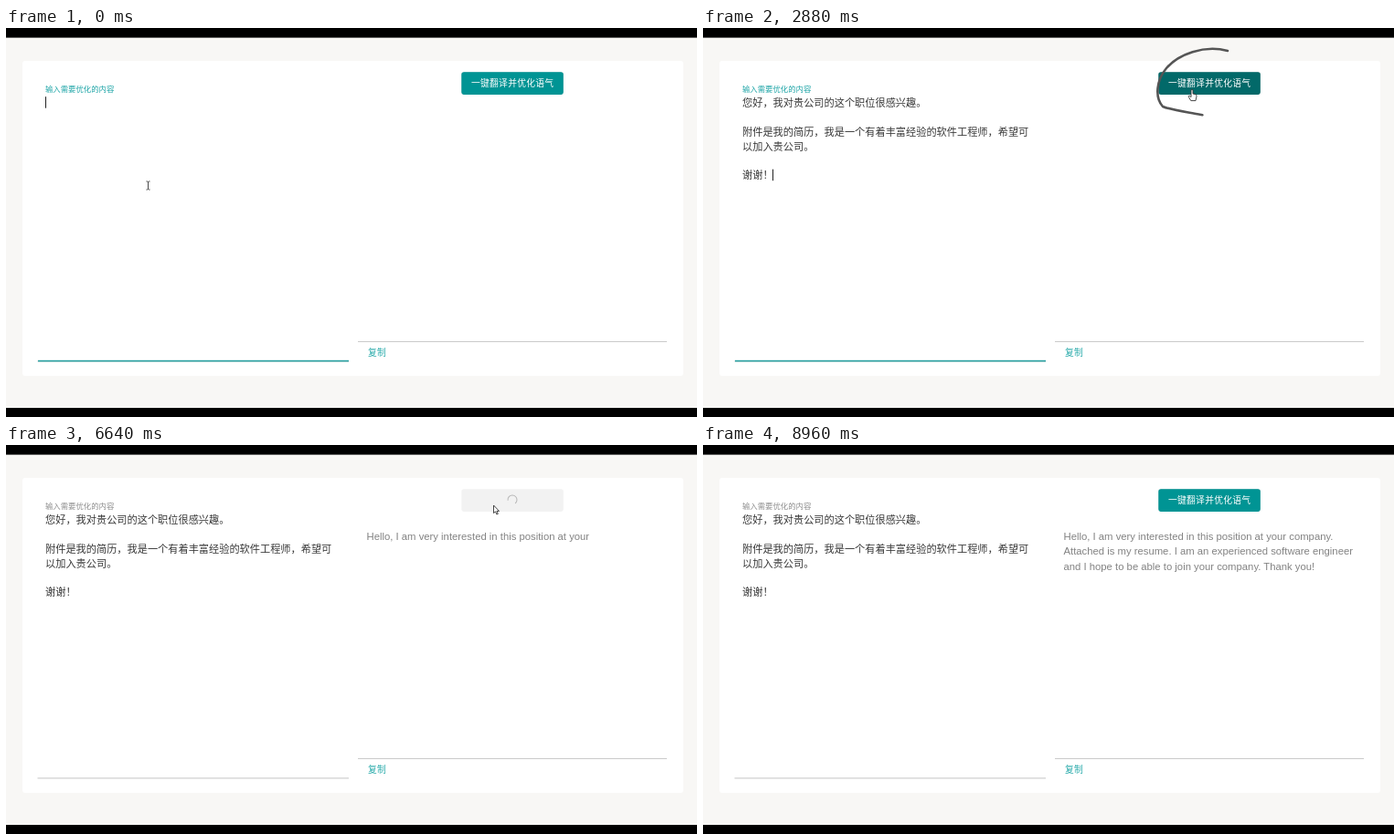
Write an HTML page that moves like this. It is 756 by 426 pixels and loops after 9040 ms.

```html
<!DOCTYPE html>
<html lang="zh-CN">
<head>
<meta charset="utf-8">
<title>Translate and polish</title>
<style>
html, body { margin: 0; width: 100%; height: 100%; overflow: hidden; background: #f8f7f5; }
svg { display: block; width: 756px; height: 426px; font-family: "Noto Sans CJK SC", "Noto Sans CJK", sans-serif; }
text { white-space: pre; }
.input { font-size: 11.2px; fill: #383838; }
.label { font-size: 8.4px; }
.action { font-size: 9.8px; letter-spacing: .24px; }
.output { font: 11.3px "Liberation Sans", Arial, sans-serif; fill: #828282; }
.raised { filter: drop-shadow(0 .8px .6px rgba(0, 0, 0, .2)); }
.pointer path { fill: #fff; stroke: #333; stroke-width: .9; stroke-linejoin: round; }
</style>
</head>
<body>
<svg viewBox="0 0 756 426">
  <rect width="756" height="426" fill="#f8f7f5"/>
  <rect x="18" y="36" width="723" height="345" rx="3" fill="#fff"/>
  <rect width="756" height="10.6"/>
  <rect y="416" width="756" height="10"/>

  <text id="label" class="label" x="43" y="70.4">输入需要优化的内容</text>
  <g id="input" class="input"></g>
  <rect id="caret" width="1" height="12.5" fill="#222"/>
  <rect x="34.5" y="364.4" width="340.5" height="1" fill="#c4c4c4"/>
  <rect id="focus" x="35" y="363.8" width="340" height="1.6" fill="#27a0a1"/>

  <rect x="385" y="343" width="338" height="1" fill="#cacaca"/>
  <text class="action" x="396" y="358.9" fill="#2aabab">复制</text>
  <g id="output" class="output"></g>

  <rect id="button" x="498.3" y="48.3" width="111.5" height="24.6" rx="2.8"/>
  <text id="caption" class="action" x="509" y="63.9" fill="#fff">一键翻译并优化语气</text>
  <circle id="spinner" cx="554" cy="60" r="5" pathLength="126.5" fill="none" stroke="#b5b5b5"/>

  <path id="ring" pathLength="100" fill="none" stroke="#555" stroke-width="2.6" stroke-linecap="round"
    d="M574 25C548 18 520 29 507 44C496 57 494 76 503 86C512 90 530 92 545 95C565 99 585 98 598 91C611 83 613 62 607 49C601 37 585 27 551 23.5"/>

  <g id="pointer" class="pointer">
    <path id="beam" d="M-2 -4.5H-.6L0 -4L.6 -4.5H2M0 -4V4M-2 4.5H-.6L0 4L.6 4.5H2" style="fill:none"/>
    <path id="arrow" d="M0 0V8.6L2 6.9L3.4 10L4.8 9.4L3.4 6.4H6Z"/>
    <path id="hand" d="M-1 1Q0 -.6 1 1V5L4 5.7Q5.3 6 5 7.8L4 12.6H-1.2L-3.7 8.4Q-4 6.6 -2.4 7.4L-1 8.6Z"/>
  </g>
</svg>
<script>
const LOOP = 9040, STEP = 80, SPIN = 1400;
const PASTE = 560, BLUR = 3340, CLICK = 3380, STREAM = 6330, WORD = 32, DONE = 7400, LEAVE = 8330;
const TEAL = [0, 148, 148], DARK = [2, 105, 105], IDLE = [242, 242, 242];
const ui = Object.fromEntries([...document.querySelectorAll('[id]')].map(e => [e.id, e]));

function addText(parent, x, y, content) {
  const node = document.createElementNS('http://www.w3.org/2000/svg', 'text');
  node.setAttribute('x', x);
  node.setAttribute('y', y);
  node.textContent = content;
  parent.append(node);
  return node;
}

const letter = ['您好，我对贵公司的这个职位很感兴趣。', '', '附件是我的简历，我是一个有着丰富经验的软件工程师，希望可',
  '以加入贵公司。', '', '谢谢！'];
letter.forEach((s, i) => addText(ui.input, 43, 85.7 + 15.95 * i, s));

const reply = ['Hello, I am very interested in this position at your company.',
  'Attached is my resume. I am an experienced software engineer',
  'and I hope to be able to join your company. Thank you!'].map(s => s.split(' '));
const replyLines = reply.map((_, i) => addText(ui.output, 394.5, 103.7 + 16.5 * i, ''));

const clamp = u => Math.min(1, Math.max(0, u));
const ramp = (t, start, length) => clamp((t - start) / length);
const smooth = u => u * u * (3 - 2 * u);
const out = u => 1 - (1 - u) ** 2;
const mix = (a, b, u) => a.map((v, i) => v + (b[i] - v) * u);
const rgb = c => `rgb(${c.map(Math.round)})`;
const show = (node, on) => node.style.display = on ? '' : 'none';

// Each key is [start, length, value]; values blend from the previous one.
function track(t, first, keys, ease) {
  return keys.reduce((v, [start, length, next]) => mix(v, next, ease(ramp(t, start, length))), first);
}

function drawField(t) {
  const pasted = t >= PASTE;
  const on = pasted ? (t - PASTE) % 1000 < 500 : t < 240;
  show(ui.input, pasted);
  show(ui.caret, on && t < BLUR);
  ui.caret.setAttribute('x', pasted ? 76 : 43);
  ui.caret.setAttribute('y', pasted ? 154.7 : 75.2);
  const blur = ramp(t, BLUR, 150);
  ui.label.setAttribute('fill', rgb(mix([28, 164, 166], [140, 140, 140], blur)));
  ui.focus.setAttribute('opacity', 1 - blur);
}

function drawButton(t) {
  const busy = t >= CLICK && t < DONE;
  const color = track(t, TEAL, [[2230, 250, DARK], [CLICK, 250, IDLE], [DONE, 250, DARK], [LEAVE, 250, TEAL]], out);
  ui.button.setAttribute('fill', rgb(color));
  ui.button.setAttribute('class', busy ? '' : 'raised');
  show(ui.caption, !busy);
  show(ui.spinner, busy);
  if (!busy) return;
  const u = (t - CLICK + 66) % SPIN / SPIN;
  const grow = smooth(clamp(u * 2)), slide = smooth(clamp(u * 2 - 1));
  ui.spinner.setAttribute('stroke-dasharray', `${1 + 99 * grow} 200`);
  ui.spinner.setAttribute('stroke-dashoffset', -15 * grow - 110 * slide);
  ui.spinner.setAttribute('transform', `rotate(${360 * u} 554 60)`);
}

function drawReply(t) {
  let left = t < STREAM ? 0 : Math.floor((t - STREAM) / WORD) + 1;
  reply.forEach((words, i) => {
    replyLines[i].textContent = words.slice(0, Math.max(0, left)).join(' ');
    left -= words.length;
  });
}

function drawRing(t) {
  const u = ramp(t, 2480, 800);
  show(ui.ring, u > 0 && t < 4160);
  ui.ring.setAttribute('stroke-dasharray', `${100 * u} 200`);
  ui.ring.setAttribute('opacity', 1 - ramp(t, 3960, 200));
}

function drawPointer(t) {
  const [x, y] = track(t, [155.5, 172.5], [[1700, 640, [535, 67]], [CLICK, 40, [533.5, 66]],
    [DONE, 200, [537.5, 65.8]], [8240, 360, [676, 120]]], smooth);
  const over = x > 498 && x < 610 && y > 48 && y < 73;
  const busy = t >= CLICK && t < DONE;
  const kind = x < 375 ? 'beam' : over && !busy ? 'hand' : 'arrow';
  for (const k of ['beam', 'hand', 'arrow']) show(ui[k], k === kind);
  show(ui.pointer, t < 8600);
  ui.pointer.setAttribute('transform', `translate(${x} ${y})`);
}

const begin = performance.now();
function frame() {
  const t = Math.floor((performance.now() - begin) % LOOP / STEP) * STEP;
  for (const draw of [drawField, drawButton, drawReply, drawRing, drawPointer]) draw(t);
  requestAnimationFrame(frame);
}
frame();
</script>
</body>
</html>
```
